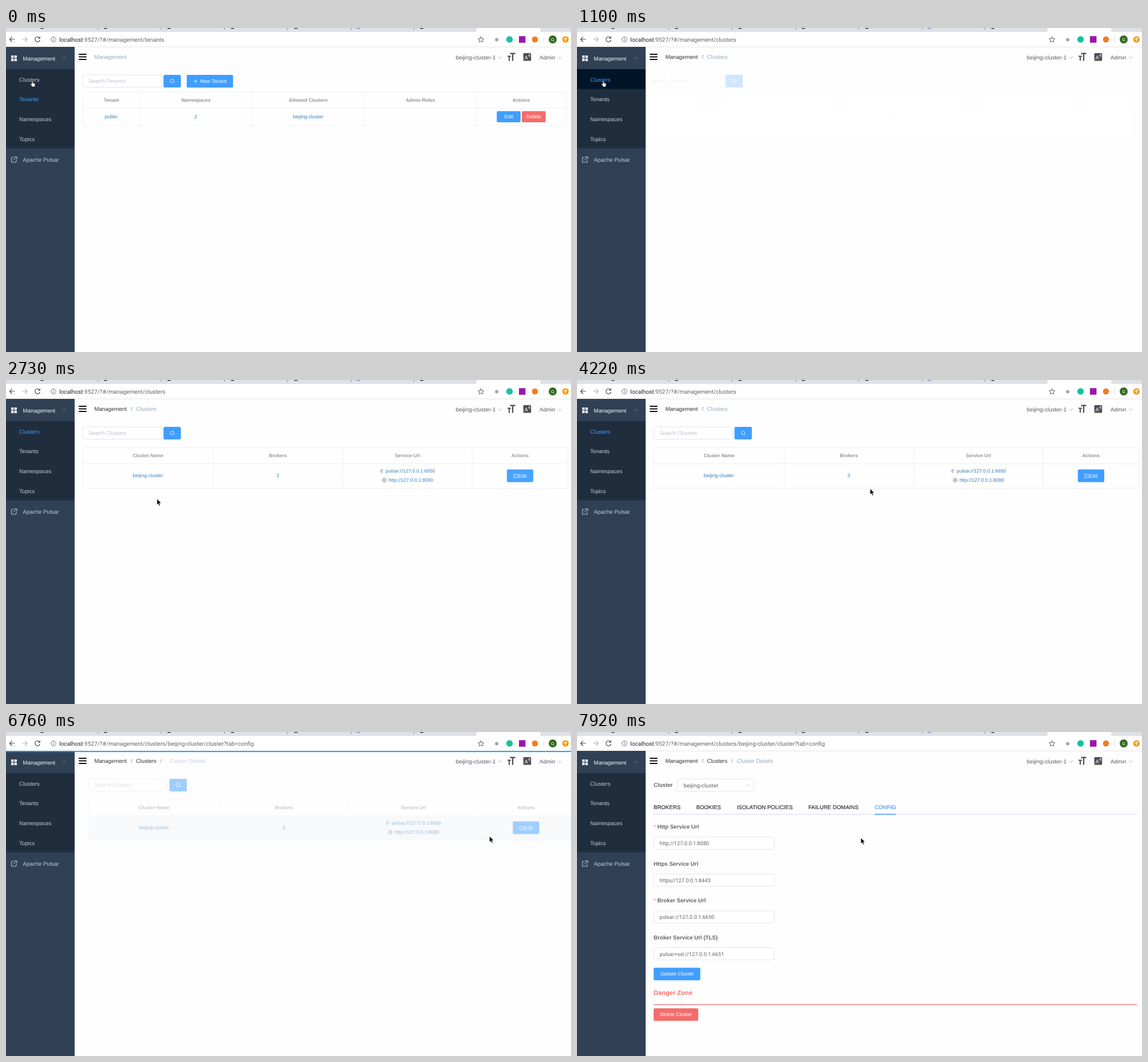
An HTML page that plays this animation: 988 px wide and 567 px high, repeating every 8000 ms.

```html
<!DOCTYPE html>
<html lang="en">
<head>
<meta charset="utf-8">
<title>Cluster management</title>
<style>
html, body { margin: 0; width: 100%; height: 100%; overflow: hidden; background: #fefefe; }
svg { display: block; width: 988px; height: 567px; }
text { font-family: "Liberation Sans", Arial, sans-serif; font-size: 9.7px; text-rendering: geometricPrecision; white-space: pre; }
.url, .input { font-family: Roboto, "Open Sans", sans-serif; }
.url { font-size: 10.12px; }
.input { font-size: 9.23px; }
.hint { font-size: 9.4px; }
.pick { font-size: 9.8px; }
.th { font-size: 8.35px; font-weight: bold; fill: #909399; text-anchor: middle; }
.td { font-size: 8.6px; fill: #337ab7; }
.mid { text-anchor: middle; }
.btn { font-size: 8.85px; fill: #fff; text-anchor: middle; }
.label { font-weight: bold; fill: #606266; }
.tab { font-size: 9.65px; stroke-width: .2; }
.line { fill: none; stroke-linecap: round; stroke-linejoin: round; }
</style>
</head>
<body>
<svg id="stage" viewBox="0 0 988 567"></svg>
<script>
const BLUE = '#409eff', RED = '#f56c6c', GRID = '#ebeef5', EDGE = '#dcdfe6', DARK = '#303133', PALE = '#97a8be', MENU = '#bfcbd9';

const rect = (x, y, w, h, fill, more = '') => `<rect x="${x}" y="${y}" width="${w}" height="${h}" fill="${fill}" ${more}/>`;
const dot = (x, y, r, fill, more = '') => `<circle cx="${x}" cy="${y}" r="${r}" fill="${fill}" ${more}/>`;
const line = (d, color, w = 1, more = '') => `<path class="line" d="${d}" stroke="${color}" stroke-width="${w}" ${more}/>`;
const text = (x, y, s, fill, cls = '', more = '') => `<text x="${x}" y="${y}" ${fill ? `fill="${fill}"` : ''} class="${cls}" ${more}>${s}</text>`;
const group = (id, body) => `<g id="${id}">${body}</g>`;
const box = (x, y, w, h) => rect(x, y, w, h, '#fff', `rx="2.8" stroke="${EDGE}" stroke-width=".8"`);
const button = (x, y, w, h, fill, label = '', tx = x + w / 2, more = '') =>
  rect(x, y, w, h, fill, 'rx="2.1" ' + more) + text(tx, y + h / 2 + 3, label, '', 'btn');
const chevron = (x, y, dir, color = '#909399') => line(`M${x - 2.8} ${y - 1.4 * dir}l2.8 ${2.8 * dir} 2.8 ${-2.8 * dir}`, color, .8);

function browser() {
  const tabs = [160.5, 271.5, 382.5, 492.5, 603.5, 713.5];
  const icons = [[63, '#3b3f4a'], [174, '#24292e'], [285, '#24292e'], [396, '#24292e'], [507, '#24292e'], [616, '#6f7fb0'], [727, '#24292e']];
  return rect(0, 0, 988, 33, '#fff') +
    '<path d="M0 0H823V3Q823 7 819 7H0ZM934 0H988V7H938Q934 7 934 3Z" fill="#dee1e6"/>' +
    tabs.map(x => line(`M${x} 0V3`, '#80868b', .9, 'stroke-linecap="butt"')).join('') +
    icons.map(([x, c]) => dot(x, -2.5, 4, c)).join('') +
    line('M15 20H6.5M10.3 16L6.3 20l4 4', '#4a4d51', 1.2) +
    line('M28.5 20H37M33.2 16l4 4-4 4', '#b5b8bc', 1.2) +
    line('M58.4 17.2A4.3 4.3 0 1 0 59.2 21.2M59.2 15.3V18H56.4', '#4a4d51', 1.2) +
    dot(83, 20, 4.3, 'none', 'stroke="#5f6368" stroke-width=".9"') + line('M83 19.6V22.2M83 17.7v.1', '#5f6368', 1) +
    `<text class="url" x="93.3" y="23.6" fill="#202124">localhost<tspan id="path" fill="#5f6368"></tspan></text>` +
    line('M830.5 15.3l1.5 3.2 3.5.4-2.6 2.4.7 3.4-3.1-1.7-3.1 1.7.7-3.4-2.6-2.4 3.5-.4Z', '#4a4d51', .9) +
    dot(858, 20.5, 3, '#a5a7aa') + dot(880.5, 20, 5.7, '#15c39a') + rect(897, 14.3, 11.4, 11.4, '#9a12b3') +
    dot(925, 20, 5.3, '#f47b20') + line('M940.5 14.5V25.5', '#dadce0', .8) +
    dot(956, 20, 7, '#33691e') + text(956, 22.8, 'G', '#fff', 'mid', 'style="font-size:7.8px"') +
    dot(978.3, 20, 5.6, '#f29900') + line('M978.3 23V17.4M976 19.5l2.3-2.3 2.3 2.3', '#fff', 1.2) +
    rect(0, 32.7, 988, .8, '#dcdddf');
}

function sidebar() {
  const items = [['Clusters', 93.6], ['Tenants', 128.4], ['Namespaces', 163], ['Topics', 197.6]];
  const tiles = [[9, 48], [14.6, 48], [9, 53.6], [14.6, 53.6]];
  return rect(0, 33, 120, 534, '#304156') + rect(0, 72, 120, 138.5, '#1f2d3d') +
    rect(0, 72, 120, 34.7, '#001528', 'id="hover"') +
    tiles.map(([x, y]) => rect(x, y, 4.4, 4.4, '#f4f4f5', 'rx=".6"')).join('') +
    text(29.6, 57, 'Management', '#f4f4f5') + chevron(102, 52.2, -1) +
    items.map(([s, y], i) => text(23, y, s, MENU, '', `id="item${i}"`)).join('') +
    line('M13 226.6H9.6V235H18V231.4M14.8 225.6H18.8V229.6M18.4 226L13.2 231.2', MENU, 1) +
    text(29.6, 234.4, 'Apache Pulsar', MENU);
}

function navbar() {
  return [46, 50.5, 55].map(y => line(`M128 ${y}H140`, '#111', 1.9)).join('') +
    text(154.4, 54.2, 'Management', '', '', 'id="crumb0"') +
    group('slash1', text(218.4, 54.2, '/', '#8a8f99')) + text(227.6, 54.2, 'Clusters', '', '', 'id="crumb1"') +
    group('slash2', text(270, 54.2, '/', '#8a8f99')) + text(279.6, 54.2, 'Cluster Details', PALE, '', 'id="crumb2"') +
    text(786.2, 55, 'beijing-cluster-1', '#5a5e66', '', 'style="font-size:9.9px"') + chevron(864.3, 52, 1) +
    '<path d="M881.5 43.5H890.5V45.7H887.1V57.5H884.9V45.7H881.5ZM877 48.5H883V50.4H880.9V57.5H879V50.4H877Z" fill="#4a4d55"/>' +
    rect(904.6, 44, 13.6, 13.6, '#4a4d55', 'rx="1.6"') + text(906.4, 55, 'A', '#fff', '', 'style="font-size:9.4px"') +
    line('M913.3 47H916.6M915 46V47M913.7 50.5Q916 49.5 916.2 47M913.8 47.8Q914.5 49.5 916.4 50.5', '#fff', .6) +
    text(933, 55, 'Admin', '#5a5e66') + chevron(968.4, 52, 1);
}

const search = hint => box(134.4, 82.3, 137.6, 21.4) + text(144.6, 96.4, hint, '#c0c4cc', 'input hint') +
  button(275.4, 82, 30.4, 22, BLUE) + dot(290.6, 92.6, 3, 'none', 'stroke="#fff" stroke-width=".8"') + line('M292.8 94.8l1 1', '#fff', .8);

function table(x, y, right, head, bottom, cols, names) {
  const edges = [x, ...cols, right];
  return {
    top: line(`M${x} ${head}V${y}H${right}V${head}ZM` + cols.map(c => `${c} ${y}V${head}`).join('M'), GRID, .9) +
      names.map((s, i) => text((edges[i] + edges[i + 1]) / 2, (y + head) / 2 + 3.1, s, '', 'th')).join(''),
    body: line(`M${x} ${head}V${bottom}H${right}V${head}M` + cols.map(c => `${c} ${head}V${bottom}`).join('M'), GRID, .9)
  };
}

function tenants() {
  const t = table(134.4, 112, 979.4, 139.8, 171, [234.3, 430.4, 626.5, 822.6], ['Tenant', 'Namespaces', 'Allowed Clusters', 'Admin Roles', 'Actions']);
  return search('Search Tenants') + button(316, 82, 81, 22.3, BLUE, 'New Tenant', 362.5) + line('M328.5 93H334.5M331.5 90V96', '#fff', .8) +
    t.top + t.body + text(184, 157.6, 'public', '', 'td mid') + text(332, 157.8, '2', '', 'td mid') + text(528.3, 157.6, 'beijing-cluster', '', 'td mid') +
    button(858.2, 145.4, 41.6, 19.6, BLUE, 'Edit') + button(902, 145.4, 41.8, 19.6, RED, 'Delete');
}

function clusters() {
  const t = table(134.4, 118.3, 982.2, 146, 189.6, [362.4, 588.8, 815.4], ['Cluster Name', 'Brokers', 'Service Url', 'Actions']);
  const row = rect(134.4, 146.4, 847.8, 43, '#f3f5f9', 'id="rowHover"') + t.body +
    text(248, 170.2, 'beijing-cluster', '', 'td mid') + text(475.2, 170.2, '3', '', 'td mid') +
    line('M655.8 155.5V160.8M653.8 159.6L655.8 161.6M657.6 163V157.2M659.6 158.4L657.6 156.6', '#8a8d93', .8) +
    text(664, 162.4, 'pulsar://127.0.0.1:6650', '', 'td', 'style="font-size:8.45px"') +
    dot(661.4, 175.2, 3.4, 'none', 'stroke="#85888e" stroke-width=".8"') + line('M658 175.2H664.8M661.4 171.8Q658.4 175.2 661.4 178.6Q664.4 175.2 661.4 171.8', '#85888e', .6) +
    text(669, 178.4, 'http://127.0.0.1:8080', '', 'td', 'style="font-size:8.5px"') +
    button(875.8, 156.6, 46.2, 22.2, BLUE, 'Edit', 902.8, 'id="edit"') +
    line('M891.4 164.6H888.2V171H894.4V168M891 168.4L895 164.4', '#fff', .8);
  return search('Search Clusters') + t.top + group('row', row) +
    group('loading', rect(134, 118, 849, 72.2, '#fff', 'opacity=".9"') +
      dot(0, 0, 11.6, 'none', `id="spinner" pathLength="125.66" stroke="${BLUE}" stroke-width="1.3" stroke-linecap="round"`));
}

function details() {
  const fields = [['Http Service Url', 'http://127.0.0.1:8080', 1], ['Https Service Url', 'https//127.0.0.1:8443', 0],
    ['Broker Service Url', 'pulsar://127.0.0.1:6650', 1], ['Broker Service Url (TLS)', 'pulsar+ssl://127.0.0.1:6651', 0]];
  const tabs = [['BROKERS', 134], ['BOOKIES', 208.4], ['ISOLATION POLICIES', 279.4], ['FAILURE DOMAINS', 404.4], ['CONFIG', 520.4]];
  return text(134, 96.4, 'Cluster', '', 'label') + box(175.8, 82.3, 133.6, 21.4) +
    text(186.2, 96.5, 'beijing-cluster', '#606266', 'input pick') + chevron(297.6, 93, 1, '#c0c4cc') +
    rect(134, 143.4, 845.6, 1.4, '#dfe4ed') + rect(520.4, 143.2, 37.2, 1.5, BLUE) +
    tabs.map(([s, x], i) => { const c = i == 4 ? BLUE : DARK; return text(x, 134.6, s, c, 'tab', `stroke="${c}"`); }).join('') +
    fields.map(([name, value, must], i) => {
      const y = 169.4 + i * 64.5;
      return (must ? text(134, y, '*', RED) : '') + text(must ? 140.6 : 134, y, name, '', 'label') +
        box(134.4, y + 14.6, 210.6, 21.4) + text(144.6, y + 28.8, value, '#606266', 'input');
    }).join('') +
    button(134, 412.4, 81.6, 22, BLUE, 'Update Cluster') +
    text(134, 459.6, 'Danger Zone', RED, '', 'style="font-size:11.1px;font-weight:bold"') + rect(134, 476.4, 845.6, 1.3, RED) +
    button(134, 483.4, 78, 22, RED, 'Delete Cluster');
}

document.getElementById('stage').innerHTML =
  '<clipPath id="main"><path d="M120 72H988V567H120Z"/></clipPath>' +
  rect(0, 0, 988, 567, '#fefefe') +
  `<g clip-path="url(#main)">${group('tenants', tenants())}${group('clusters', clusters())}${group('details', details())}</g>` +
  navbar() + browser() + sidebar() + rect(0, 33.2, 988, 1.9, '#2299dd', 'id="progress"') +
  group('cursor', '<path id="arrow" d="M0 0V10.6L2.4 8.4 4.1 12.2 5.9 11.4 4.3 7.7H7.5Z" fill="#000" stroke="#fff" stroke-width=".7"/>' +
    '<path id="hand" d="M0 0Q1 0 1 1V4L4 4.7Q5.3 5.2 5.1 6.6L4.5 9.4V11H-.9V9.8L-3.6 6Q-3.7 4.8-2.4 5.2L-1 6.3V1Q-1 0 0 0Z" fill="#fff" stroke="#111" stroke-width=".8"/>');

const el = {};
document.querySelectorAll('[id]').forEach(e => el[e.id] = e);

const LOOP = 8000;
// bursts of screen updates: first, last, count
const bursts = [[0, 0, 1], [240, 240, 1], [510, 1540, 8], [1690, 2730, 8], [2880, 3180, 3],
  [4220, 4820, 5], [5570, 6010, 4], [6610, 7200, 5], [7530, 7920, 3]];
const ticks = bursts.flatMap(([a, b, n]) => Array.from({ length: n }, (_, i) => Math.floor(a + (n > 1 ? (b - a) * i / (n - 1) : 0))));
// pointer: time, x, y, hand
const track = [[0, 46, 92, 1], [1540, 46, 92, 1], [1690, 264, 203, 0], [1830, 264, 208, 0], [2730, 264, 208, 0],
  [2880, 290, 182, 0], [3180, 370, 190, 0], [4220, 512.5, 190, 0], [4820, 630, 175, 0], [5570, 690, 183, 0],
  [5860, 884, 172, 0], [6010, 893.5, 169.5, 1], [6610, 893.5, 169.5, 1], [6750, 850, 182, 0], [7200, 556, 199, 0],
  [7530, 528, 192, 0], [7920, 496.3, 185, 0]];

const clamp = v => Math.min(1, Math.max(0, v));
function bezier(x1, y1, x2, y2) {
  const at = (a, b, u) => 3 * a * u * (1 - u) ** 2 + 3 * b * u * u * (1 - u) + u ** 3;
  return x => {
    if (x <= 0 || x >= 1) return clamp(x);
    let lo = 0, hi = 1;
    for (let i = 0; i < 24; i++) { const m = (lo + hi) / 2; at(x1, x2, m) < x ? lo = m : hi = m; }
    return at(y1, y2, lo);
  };
}
const ease = bezier(.25, .1, .25, 1), easeInOut = bezier(.42, 0, .58, 1);
const set = (e, attrs) => { for (const k in attrs) e.setAttribute(k, attrs[k]); };

function pointer(t) {
  let i = 0;
  while (i < track.length - 2 && track[i + 1][0] <= t) i++;
  const [a, b] = [track[i], track[i + 1]], k = clamp((t - a[0]) / (b[0] - a[0]));
  return { x: a[1] + (b[1] - a[1]) * k, y: a[2] + (b[2] - a[2]) * k, hand: k < 1 ? a[3] : b[3] };
}

function page(e, enter, leave) {
  const shown = enter * (1 - leave);
  set(e, { opacity: shown, transform: `translate(${20.8 * (leave - 1 + enter)} 0)`, display: shown > 0 ? 'inline' : 'none' });
}

function spin(t) {
  const s = Math.max(0, t - 1010) / 1000, u = s / 1.5 % 1, half = easeInOut(u < .5 ? u * 2 : u * 2 - 1);
  const dash = u < .5 ? 1 + 89 * half : 90, shift = u < .5 ? 40 * half : 40 + 80 * half;
  set(el.spinner, { transform: `translate(559 154.4) rotate(${s * 180})`, 'stroke-dasharray': `${dash} 200`, 'stroke-dashoffset': -shift });
}

function progress(t) {
  const s = t - (t < 6000 ? 510 : 6610);
  const on = s >= 0 && s < 400;
  set(el.progress, { width: 988 * clamp(.2 + .79 * s / 145), opacity: on ? 1 - clamp((s - 160) / 200) : 0 });
}

function render(now) {
  const t = ticks.filter(k => k <= now).pop();
  const step = (from, ms) => ease((t - from) / ms);
  const list = t >= 510, detail = t >= 6610, p = pointer(t);

  el.path.textContent = ':9527/?#/management/' + (detail ? 'clusters/beijing-cluster/cluster?tab=config' : list ? 'clusters' : 'tenants');
  set(el.item0, { fill: list && !detail ? BLUE : MENU });
  set(el.item1, { fill: list ? MENU : BLUE });
  set(el.hover, { opacity: t < 240 ? 0 : 1 - step(1690, 300) });

  set(el.crumb0, { fill: list ? DARK : PALE });
  set(el.crumb1, { fill: detail ? DARK : PALE });
  set(el.slash1, { opacity: +list });
  set(el.slash2, { opacity: +detail });
  [[el.crumb1, 510], [el.crumb2, 6610]].forEach(([e, from]) => {
    const k = step(from, 500);
    set(e, { opacity: k, transform: `translate(${13.8 * (1 - k)} 0)` });
  });

  page(el.tenants, 1, step(510, 500));
  page(el.clusters, step(1010, 500), step(6610, 500));
  page(el.details, step(7200, 500), 0);
  set(el.row, { opacity: t >= 1690 ? 1 : 0 });
  set(el.loading, { opacity: 1 - step(2510, 300) });
  spin(t);
  progress(t);

  const over = p.x > 134 && p.y > 146 && p.y < 189;
  set(el.rowHover, { opacity: +over });
  set(el.edit, { fill: over && p.x > 876 ? '#66b1ff' : BLUE });
  set(el.cursor, { transform: `translate(${p.x} ${p.y})` });
  set(el.arrow, { opacity: p.hand ? 0 : 1 });
  set(el.hand, { opacity: p.hand });
}

const start = performance.now();
function frame() {
  render((performance.now() - start) % LOOP);
  requestAnimationFrame(frame);
}
frame();
</script>
</body>
</html>
```
